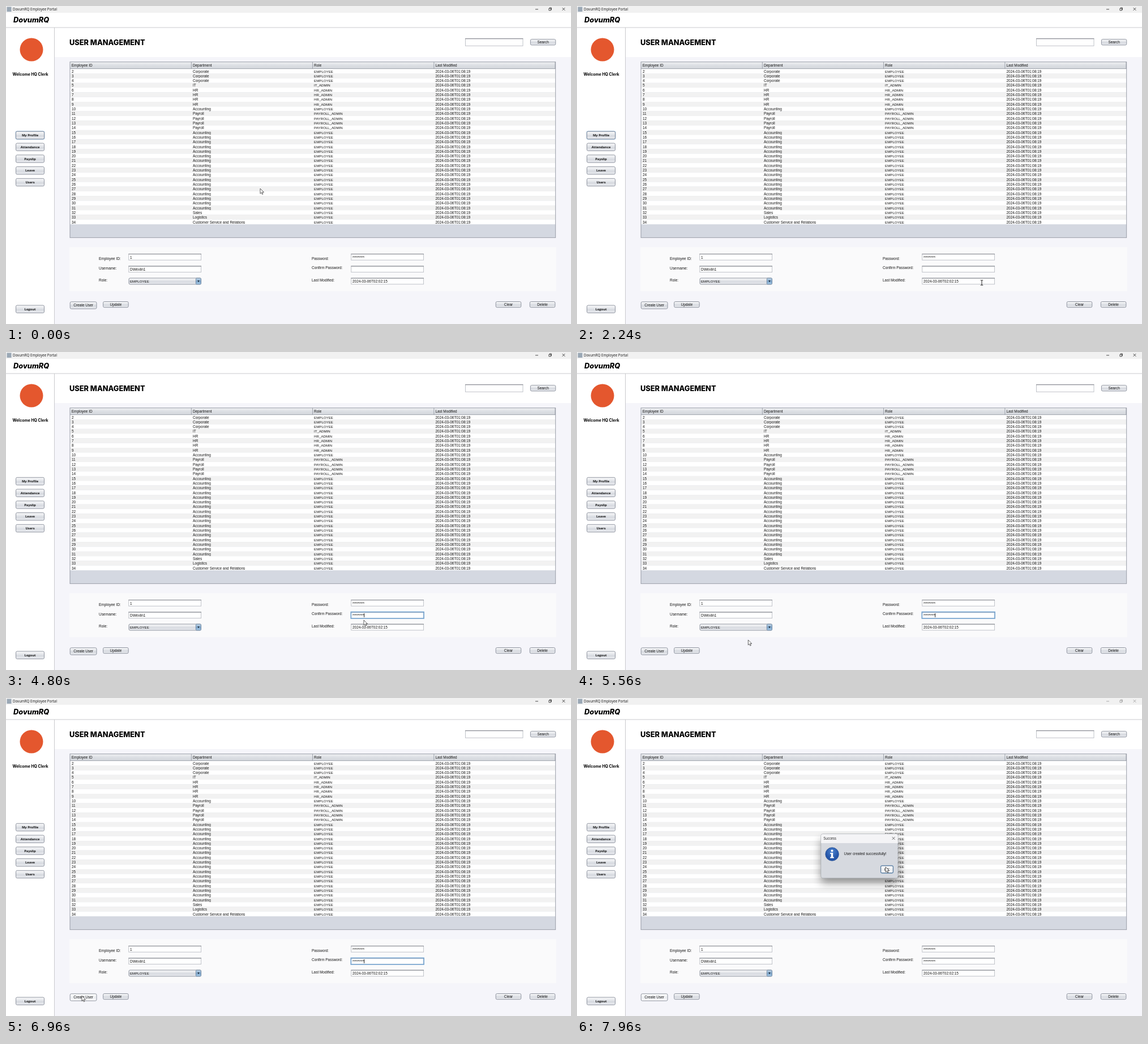
Write an HTML page that moves like this. It is 998 px wide and 561 px high and loops after 8000 ms.

```html
<!DOCTYPE html>
<html lang="en">
<head>
<meta charset="utf-8">
<title>Employee Portal</title>
<style>
html, body { margin: 0; width: 100%; height: 100%; overflow: hidden; background: #fff; }
svg { display: block; width: 100vw; height: 100vh; }
text { font: 6.45px "Liberation Sans", Arial, sans-serif; fill: #151515; white-space: pre; }
.ui { font: 6.2px "Open Sans", "Noto Sans", sans-serif; }
.nav { font: 700 5.8px "Open Sans", "Noto Sans", sans-serif; }
.caps { font-size: 6.15px; }
.head { font: 800 12.8px Inter, sans-serif; fill: #000; }
.brand { font: italic 800 12.8px Inter, sans-serif; fill: #000; }
.hello { font: 700 6.9px Inter, sans-serif; fill: #000; }
.stars { font-size: 6.75px; }
</style>
</head>
<body>
<svg id="stage" viewBox="0 0 998 561">
  <defs>
    <linearGradient id="btn" x2="0" y2="1">
      <stop offset="0" stop-color="#fafafb"/><stop offset=".5" stop-color="#dde0e5"/>
      <stop offset=".55" stop-color="#d5d8de"/><stop offset="1" stop-color="#eceef2"/>
    </linearGradient>
    <linearGradient id="btnHover" x2="0" y2="1">
      <stop offset="0" stop-color="#fff"/><stop offset=".55" stop-color="#eceef1"/><stop offset="1" stop-color="#fcfcfd"/>
    </linearGradient>
    <linearGradient id="arrowFill" x2="0" y2="1">
      <stop offset="0" stop-color="#c3d6e8"/><stop offset=".55" stop-color="#7fa7cc"/><stop offset="1" stop-color="#a9cbe8"/>
    </linearGradient>
    <linearGradient id="header" x2="0" y2="1">
      <stop offset="0" stop-color="#f0f1f3"/><stop offset=".5" stop-color="#dcdfe4"/><stop offset="1" stop-color="#d3d6dc"/>
    </linearGradient>
    <radialGradient id="info" cy=".3">
      <stop offset="0" stop-color="#4c83cf"/><stop offset="1" stop-color="#2455a8"/>
    </radialGradient>
    <filter id="blur" x="-30%" y="-30%" width="160%" height="180%"><feGaussianBlur stdDeviation="8"/></filter>
  </defs>
</svg>
<script>
const LOOP = 8000, STEP = 40;
const stage = document.getElementById('stage');

function add(tag, attrs, parent = stage) {
  const node = document.createElementNS('http://www.w3.org/2000/svg', tag);
  for (const key in attrs) node.setAttribute(key, attrs[key]);
  parent.append(node);
  return node;
}
const group = () => add('g', {});
const rect = (x, y, width, height, fill, more = {}, parent) =>
  add('rect', { x, y, width, height, fill, ...more }, parent);
const line = (d, stroke, width = 1, parent) =>
  add('path', { d, stroke, 'stroke-width': width, fill: 'none' }, parent);
function label(text, x, y, cls = '', parent = stage, anchor = 'start') {
  const node = add('text', { x, y, class: cls, 'text-anchor': anchor }, parent);
  node.textContent = text;
  return node;
}

const contains = (b, [x, y]) => x >= b.x && x <= b.x + b.w && y >= b.y && y <= b.y + b.h;
const buttons = [], fields = [];

function button(text, x, y, w, h, cls = '', parent = stage) {
  const halo = rect(x - .8, y - .8, w + 1.6, h + 1.6, '#73a4d1', { rx: 3 }, parent);
  const face = rect(x, y, w, h, 'url(#btn)', { rx: 2.2, stroke: '#858b97', 'stroke-width': .9 }, parent);
  halo.style.display = 'none';
  label(text, x + w / 2, y + h / 2 + 2.2, cls, parent, 'middle');
  const item = { x, y, w, h, face, halo };
  buttons.push(item);
  return item;
}
function field(x, y, w, h) {
  rect(x, y, w, h, '#fff', { stroke: '#b9bcc3', 'stroke-width': .9 });
  line(`M${x - .4} ${y}h${w + .8}`, '#7f8289');
  fields.push({ x, y, w, h });
}
const show = (node, on) => { node.style.display = on ? '' : 'none'; };

// Window frame
rect(0, 0, 998, 561, '#fff');
rect(0, 0, 998, 12, '#f1f1f1');
rect(1.5, 1.5, 8, 8.5, '#9aa8b5');
label('DovumRQ Employee Portal', 12, 8.3, 'ui');
const caption = add('path', {
  d: 'M935 5.8h5M982.6 3l4.8 4.8m0-4.8l-4.8 4.8M959 4.2h3.4v3.6h-3.4zM960.2 4V3h3.2v3.6h-1',
  fill: 'none', 'stroke-width': .8
});
label('DovumRQ', 13, 29.2, 'brand');
rect(86, 90, 912, 471, '#f5f5fa');
line('M0 38h998M85.5 38v523', '#c9cacd');

// Sidebar
add('circle', { cx: 45, cy: 77, r: 20.5, fill: '#e4572e' });
label('Welcome HQ Clerk', 43, 122.6, 'hello', stage, 'middle');
const profile = ['My Profile', 'Attendance', 'Payslip', 'Leave', 'Users']
  .map((name, i) => button(name, 17.5, 221.3 + i * 20.75, 50, 13.4, 'nav'))[0];
button('Logout', 17.5, 528, 50, 13.4, 'nav');

// Heading and search
label('USER MANAGEMENT', 112, 69.2, 'head');
field(811.5, 57.7, 101.5, 12.6);
button('Search', 926.4, 58.7, 44.4, 10.2);

// Table
const ROW = 8.3125, TOP = 110.8;
const columns = [113.3, 327.4, 541.5, 755.9];
function rowInfo(id) {
  if (id < 5) return ['Corporate', 'EMPLOYEE'];
  if (id === 5) return ['IT', 'IT_ADMIN'];
  if (id < 10) return ['HR', 'HR_ADMIN'];
  if (id > 10 && id < 15) return ['Payroll', 'PAYROLL_ADMIN'];
  const late = { 32: 'Sales', 33: 'Logistics', 34: 'Customer Service and Relations' };
  return [late[id] || 'Accounting', 'EMPLOYEE'];
}
rect(113, 98.7, 857.7, 310, '#d4d8e1');
rect(113, 98.7, 857.7, 12, 'url(#header)');
['Employee ID', 'Department', 'Role', 'Last Modified'].forEach((name, i) => label(name, columns[i] + 2.5, 107.2));
for (let id = 2; id <= 34; id++) {
  const y = TOP + (id - 2) * ROW;
  rect(113, y, 857.7, ROW, id % 2 ? '#f2f2f2' : '#fff');
  const [department, role] = rowInfo(id);
  [id, department, role, '2024-03-06T01:08:19'].forEach((text, i) =>
    label(text, columns[i] + 2.6, y + 6.7, i === 2 ? 'caps' : ''));
}
line('M113 110.6h857.7M327.4 98.7v12M541.5 98.7v12M755.9 98.7v12M970 98.7v12', '#8f949e', .8);
rect(113, 98.7, 857.7, 310, 'none', { stroke: '#9196a1', 'stroke-width': .9 });

// Form
rect(112, 425.5, 860, 77.5, '#fafafb');
[['Employee ID:', 164, 447.8], ['Username:', 164, 464.6], ['Role:', 164, 485.8],
 ['Password:', 540, 447.8], ['Confirm Password:', 540, 464.4], ['Last Modified:', 540, 485.8]]
  .forEach(args => label(...args));
[[216.8, 437.6], [216.8, 459], [609.8, 437.6], [609.8, 459], [609.8, 480.2]]
  .forEach(([x, y]) => field(x, y, 127.8, 10.6));
label('1', 219, 445.7);
label('DWexlin1', 219, 467.2);
label('********', 612, 445.7, 'stars');
label('2024-03-06T02:02:15', 612, 488.4);
const focusRing = rect(609.3, 458.6, 128.8, 11.4, 'none', { stroke: '#73a4d1', 'stroke-width': 1.6 });
const confirmText = label('********', 612, 467.3, 'stars');
const caret = rect(632.2, 461, .9, 7, '#111');
button('', 217, 480, 127.5, 11);
rect(335.4, 480, 9.1, 11, 'url(#arrowFill)', { stroke: '#5b7590', 'stroke-width': .7, rx: 1.5 });
add('path', { d: 'M338 484.3h4l-2 3z', fill: '#1c2a38' });
label('EMPLOYEE', 219, 487.9, 'caps');

const create = button('Create User', 113.2, 521.8, 46.8, 12.4);
button('Update', 171.6, 521.5, 44.6, 10.2);
button('Clear', 865.2, 521.5, 44.6, 10.2);
button('Delete', 925.3, 521.5, 44.6, 10.2);

// Message dialog
const dialog = group();
rect(431, 250, 136, 76, '#000', { filter: 'url(#blur)', opacity: .42 }, dialog);
rect(430.8, 239.8, 136.2, 78, '#d6d9df', { rx: 3.5, stroke: '#a5a8ae', 'stroke-width': .7 }, dialog);
add('path', { d: 'M431.1 256v-12.5q0-3.3 3.3-3.3h129q3.3 0 3.3 3.3V256z', fill: '#f4f4f6' }, dialog);
label('Success', 435.5, 250.2, 'ui', dialog);
line('M556.6 245l5 5m0-5l-5 5', '#333', .7, dialog);
add('circle', { cx: 450.6, cy: 275.5, r: 11.8, fill: 'url(#info)', stroke: '#1d4688', 'stroke-width': .6 }, dialog);
add('path', { d: 'M447.2 273h5v7.6h1.7v2h-6.8v-2h1.7v-5.6h-1.6z', fill: '#fff' }, dialog);
add('circle', { cx: 450.5, cy: 269.4, r: 2, fill: '#fff' }, dialog);
label('User created successfully!', 471.5, 277.3, '', dialog);
const ok = button('OK', 536.7, 296, 21.6, 12.6, '', dialog);
ok.halo.style.display = '';
ok.face.setAttribute('stroke', '#3f5f80');

// Pointer and click mark
const ring = add('circle', { fill: '#24bfc0', 'fill-opacity': .08, stroke: '#24bfc0', 'stroke-width': 2.2 });
const dot = add('circle', { r: 4, fill: '#24bfc0' });
const arrow = add('path', {
  d: 'M0 0v9l2.1-1.9 1.4 3.2 1.5-.7-1.4-3.1h2.9z', fill: '#fff', stroke: '#222', 'stroke-width': .7
});
const beam = line('M-2.2-4.2h1.5q.7 0 .7.7 0-.7.7-.7h1.5M0-3.5v7.5M-2.2 4.5h1.5q.7 0 .7-.7 0 .7.7.7h1.5', '#111', .9);

// time, x, y
const path = [
  [0, 449, 322], [440, 482, 300], [880, 506, 284], [1360, 282, 458], [1680, 280, 485],
  [1760, 288, 487], [2240, 715, 488], [2320, 730, 476], [2520, 650, 463], [4400, 650, 463],
  [4440, 645, 463], [4760, 645, 463], [4800, 632, 473], [5160, 904, 506], [5600, 288, 508],
  [6280, 151, 524], [6800, 151, 524], [7040, 128, 526], [7240, 128, 526], [7600, 134, 534],
  [7880, 538, 290], [7960, 545, 298], [8000, 545, 298]
];
const clicks = [[2800, 160], [3280, 200], [7080, 200]];

function pointerAt(t) {
  const i = Math.max(1, path.findIndex(p => p[0] > t));
  const [t0, x0, y0] = path[i - 1], [t1, x1, y1] = path[i];
  const u = (t - t0) / (t1 - t0), k = u * u * (3 - 2 * u);
  return [x0 + (x1 - x0) * k, y0 + (y1 - y0) * k];
}
const within = (t, a, b) => t >= a && t < b;

function render(t) {
  const pos = pointerAt(t);
  const modal = t >= 7120;
  const focused = within(t, 2800, 7080);

  for (const b of buttons) {
    const hot = modal ? b === create || b === ok && contains(b, pos) : b !== ok && contains(b, pos);
    b.face.setAttribute('fill', hot ? 'url(#btnHover)' : 'url(#btn)');
  }
  show(profile.halo, t < 2800);
  show(focusRing, focused);
  show(confirmText, t >= 3440);
  show(caret, within(t, 3920, 4980) || within(t, 5480, 5980) || within(t, 6480, 6980));
  show(dialog, modal);
  caption.setAttribute('stroke', modal ? '#9a9a9a' : '#222');

  const click = clicks.find(([start, span]) => within(t, start, start + span));
  show(ring, click);
  show(dot, click && t - click[0] >= 80);
  if (click) {
    const u = (t - click[0]) / click[1];
    for (const c of [ring, dot]) {
      c.setAttribute('cx', pos[0]);
      c.setAttribute('cy', pos[1]);
      c.setAttribute('opacity', 1 - Math.max(0, u - .4));
    }
    ring.setAttribute('r', 11.5 - 5 * u);
  }

  const overField = !modal && fields.some(f => contains({ ...f, y: f.y - 1.5, h: f.h + 1.5 }, pos));
  show(beam, overField);
  show(arrow, !overField);
  (overField ? beam : arrow).setAttribute('transform', `translate(${pos})`);
}

const origin = performance.now();
function tick() {
  const t = (performance.now() - origin) % LOOP;
  render(Math.floor(t / STEP) * STEP);
  requestAnimationFrame(tick);
}
tick();
</script>
</body>
</html>
```
